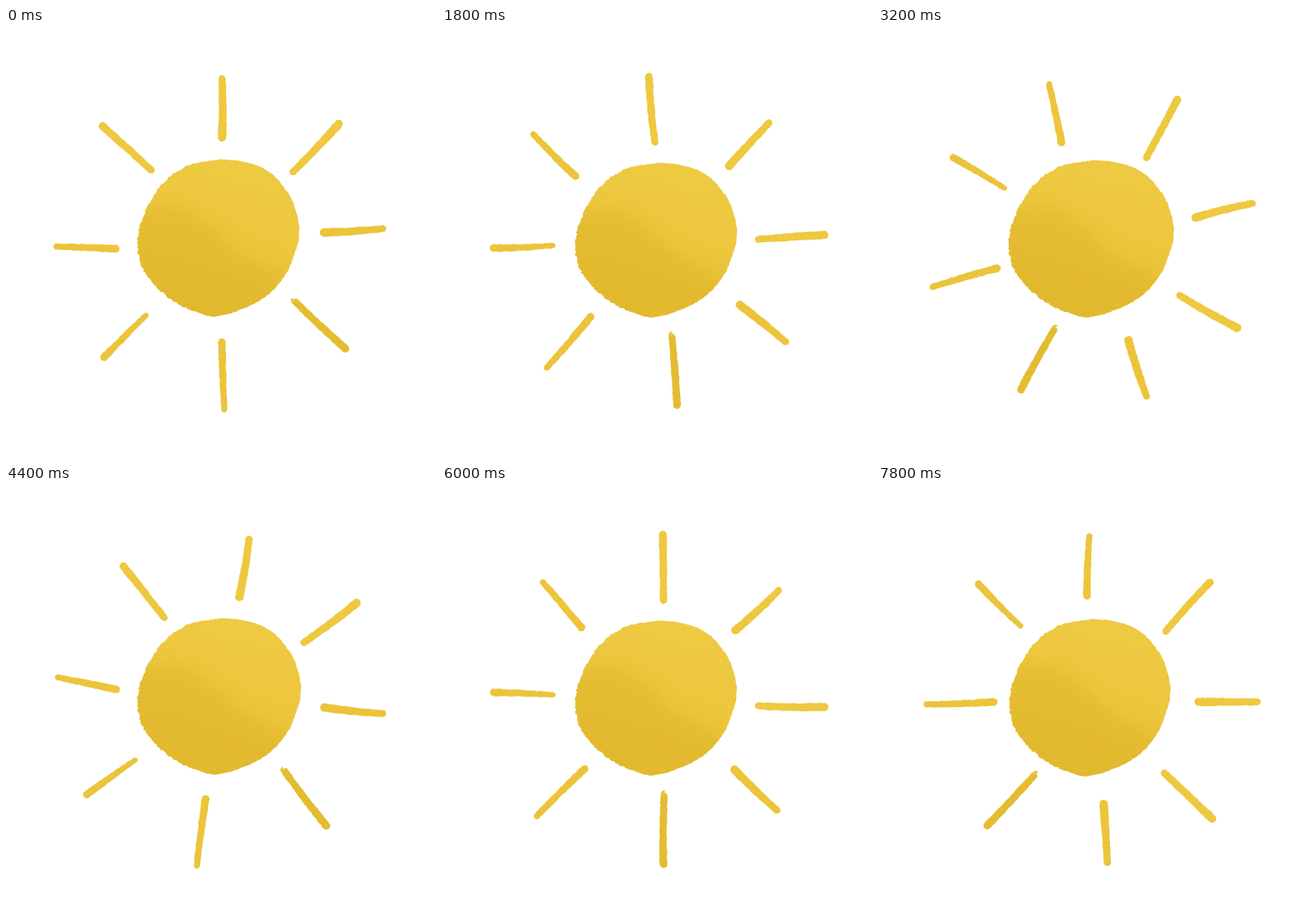
An HTML page that plays this animation: 500 by 500 pixels, repeating every 8010 ms.

```html
<!DOCTYPE html>
<html lang="en">
<head>
<meta charset="utf-8">
<title>Sun</title>
<style>
  html, body { margin: 0; width: 100%; height: 100%; overflow: hidden; background: #fff; }
  svg { display: block; width: 100%; height: 100%; }
</style>
</head>
<body>
<svg viewBox="0 0 500 500">
  <defs>
    <linearGradient id="paint" x1=".64" y1="0" x2=".36" y2="1">
      <stop offset="0" stop-color="#eeca43"/>
      <stop offset=".5" stop-color="#ecc63d"/>
      <stop offset="1" stop-color="#e5bd31"/>
    </linearGradient>
    <filter id="soft" x="-20%" y="-20%" width="140%" height="140%"><feGaussianBlur stdDeviation="9"/></filter>
    <clipPath id="disc"><path id="discEdge"/></clipPath>
  </defs>
  <g id="rays"></g>
  <g id="body">
    <path id="bodyFill" fill="url(#paint)"/>
    <g clip-path="url(#disc)">
      <path d="M140 212 L205 208 L240 232 L272 264 L325 290 L330 350 L140 350Z" fill="#dfb529" opacity=".55" filter="url(#soft)"/>
    </g>
  </g>
</svg>
<script>
const STEP = 200, STEPS = 40, LOOP = 8010, TURN_STEPS = 20;
const $ = id => document.getElementById(id);
const lerp = (a, b, k) => a + (b - a) * k;

function random(seed) {
  let s = seed * 7919 + 17;
  return () => ((s = (s * 16807) % 2147483647) / 2147483647) * 2 - 1;
}
const toPath = points => 'M' + points.map(p => p.map(v => v.toFixed(1)).join(' ')).join('L') + 'Z';

// Outer tip, inner tip, outer width, inner width, colour
const RAYS = [
  [251, 55, 251, 132, 8, 10, '#eec83f'],
  [390, 108, 331, 170, 10, 8, '#eec83f'],
  [442, 233, 365, 238, 8, 10, '#ebc43a'],
  [398, 376, 334, 316, 9, 8, '#e4bc32'],
  [254, 447, 251, 361, 7, 9, '#ebc43b'],
  [111, 386, 165, 332, 9, 6, '#ebc43b'],
  [55, 254, 132, 257, 7, 9, '#ecc53c'],
  [109, 111, 172, 168, 9, 8, '#eec83f']
];

function rayPath([x1, y1, x2, y2, w1, w2], seed) {
  const noise = random(seed), length = Math.hypot(x2 - x1, y2 - y1);
  const ux = (x2 - x1) / length, uy = (y2 - y1) / length;
  const bend = noise() * 1.2, left = [], right = [];
  for (let i = 0; i <= 40; i++) {
    // Cosine spacing gathers points at the rounded tips
    const k = (1 - Math.cos(Math.PI * i / 40)) / 2, s = k * length;
    const r = lerp(w1, w2, k) / 2;
    const tip = Math.max(0, 1 - Math.min(s, length - s) / r);
    const half = r * Math.sqrt(1 - tip * tip);
    const mid = bend * Math.sin(Math.PI * k);
    const side = d => [x1 + ux * s - uy * d, y1 + uy * s + ux * d];
    left.push(side(mid + half + noise() * .4));
    right.unshift(side(mid - half + noise() * .4));
  }
  return toPath(left.concat(right));
}

const OUTLINE = [
  [258, 154], [285, 158], [310, 170], [328, 190], [339, 213], [343, 241], [337, 265],
  [327, 288], [309, 309], [285, 324], [248, 336], [222, 331], [195, 318], [172, 298],
  [158, 276], [154, 250], [158, 228], [170, 201], [187, 178], [210, 162], [235, 156]
];

function bodyPath() {
  const noise = random(5), n = OUTLINE.length, points = [];
  OUTLINE.forEach((_, i) => {
    const [a, b, c, d] = [-1, 0, 1, 2].map(o => OUTLINE[(i + o + n) % n]);
    for (let j = 0; j < 12; j++) {
      const k = j / 12;
      const [x, y] = [0, 1].map(m => b[m] + .5 * k * (c[m] - a[m]
        + k * (2 * a[m] - 5 * b[m] + 4 * c[m] - d[m] + k * (3 * (b[m] - c[m]) + d[m] - a[m]))));
      const rough = 1 + noise() * (x < 215 ? .011 : .005);
      points.push([248 + (x - 248) * rough, 245 + (y - 245) * rough]);
    }
  });
  return toPath(points);
}

// Step, left, right, top, bottom of the wobbling disc
const WOBBLE = [
  [0, 153, 341, 153, 335], [2, 153, 343, 154, 335], [6, 155, 343, 153, 336],
  [9, 155, 343, 157, 336], [13, 155, 342, 156, 336], [16, 152, 344, 154, 336],
  [19, 153, 340, 155, 337]
];

function wobbleAt(step) {
  const i = Math.max(1, WOBBLE.findIndex(w => w[0] >= step));
  const a = WOBBLE[i - 1], b = WOBBLE[i], k = (step - a[0]) / (b[0] - a[0]);
  const [l, r, t, m] = a.slice(1).map((v, j) => lerp(v, b[j + 1], k));
  const sx = (r - l) / 189, sy = (m - t) / 182;
  return `matrix(${sx} 0 0 ${sy} ${l - 154 * sx} ${t - 154 * sy})`;
}

const NS = 'http://www.w3.org/2000/svg';
const rayPaths = RAYS.map(ray => {
  const path = document.createElementNS(NS, 'path');
  path.setAttribute('fill', ray[6]);
  return $('rays').appendChild(path);
});
const fleck = document.createElementNS(NS, 'path');
fleck.setAttribute('d', 'M331 316l2-3 1 3 3-1-2 4-3 1z');
fleck.setAttribute('fill', '#e9c54c');
$('rays').append(fleck);
for (const id of ['bodyFill', 'discEdge']) $(id).setAttribute('d', bodyPath());

let shown = -1;
function draw(time) {
  const step = Math.min(STEPS - 1, Math.floor(time % LOOP / STEP)) % TURN_STEPS;
  if (step !== shown) {
    shown = step;
    $('rays').setAttribute('transform', `rotate(${90 * step / (TURN_STEPS - 1)} 250 250)`);
    rayPaths.forEach((path, i) => path.setAttribute('d', rayPath(RAYS[i], step * 8 + i + 1)));
    $('body').setAttribute('transform', wobbleAt(step));
  }
}

const start = performance.now();
function tick() {
  draw(performance.now() - start);
  requestAnimationFrame(tick);
}
tick();
</script>
</body>
</html>
```
